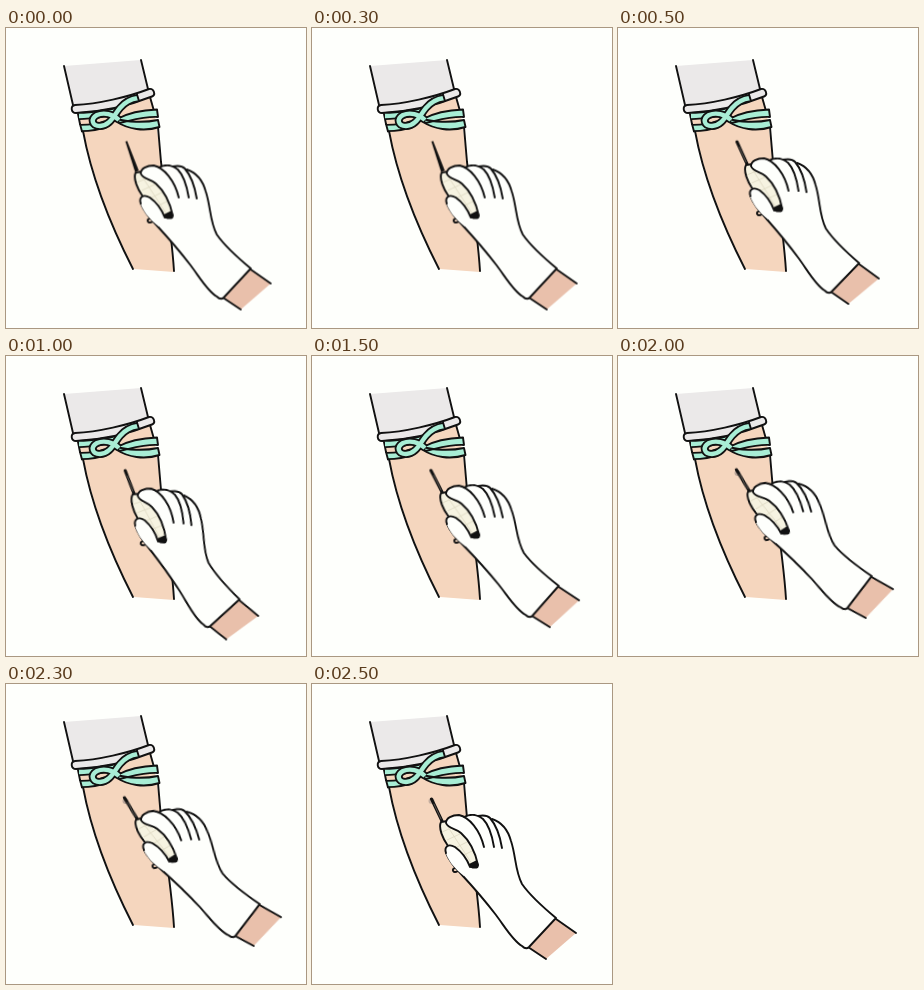
An HTML page for the animation above (3 s loop, 300 by 300 pixels).

```html
<!DOCTYPE html>
<html lang="en">
<head>
<meta charset="utf-8">
<title>Blood draw</title>
<style>
html, body { margin: 0; width: 100%; height: 100%; overflow: hidden; background: #fefffc; }
svg { display: block; width: 100vw; height: 100vh; }
.line { fill: none; stroke: #111; stroke-width: 1.9; stroke-linecap: round; stroke-linejoin: round; }
.skin { fill: #f5d6be; }
.wrist { fill: #e9c0ab; }
.cloth { fill: #ebe9e9; }
.glove { fill: #fefffc; }
.pen { fill: #f6f3e1; }
.ribbon { fill: #a8edd5; }
.edge { fill: none; stroke: #111; stroke-width: 8; stroke-linejoin: round; }
.mint { fill: none; stroke: #a8edd5; stroke-width: 4.4; stroke-linejoin: round; }

#hand { transform-origin: 120px 114px; animation: probe 3s step-end infinite; }
#bare { animation: bare 3s step-end infinite; }
#inserted { animation: inserted 3s step-end infinite; }
#bruise { fill: #55535c; opacity: 0; animation: bruise 3s step-end infinite; }

/* The needle goes in, then the hand swings about its tip. */
@keyframes probe {
  0%       { transform: translate(.7px, 6.5px); }
  16.6666% { transform: translate(-.5px, -1.2px) rotate(1.1deg); }
  33.3333% { transform: translate(-.2px, -.4px) rotate(4.7deg); }
  50%      { transform: translate(-.6px, -.6px) rotate(-1.6deg); }
  66.6666% { transform: translate(-1.2px, -1.4px) rotate(-5.5deg); }
  83.3333%, 100% { transform: none; }
}
@keyframes bare { 0% { opacity: 1; } 16.6666%, 100% { opacity: 0; } }
@keyframes inserted { 0% { opacity: 0; } 16.6666%, 100% { opacity: 1; } }
@keyframes bruise {
  0% { opacity: 0; }
  66.6666% { opacity: .35; }
  83.3333%, 100% { opacity: .3; }
}
</style>
</head>
<body>
<svg viewBox="0 0 300 300">
  <defs>
    <path id="bandLeft" d="M75 100C84 100 92 99 100 96"/>
    <path id="strap" d="M73 88C84 88 94 86 108 84"/>
    <path id="loop" d="M113 92C107 86 98 84 91 87C84 91 86 98 94 98C104 98 108 87 114 80C119 74 125 71 132 70"/>
  </defs>

  <g id="arm">
    <path class="skin" d="M70 82L145 69C149 85 152 105 155 134C161 172 166 210 168 244L128 241C105 197 88 152 77 103Z"/>
    <path class="line" d="M72 86L74 96M77 103C86 152 104 196 127 241M144 69L148 83M152 99L155 134C160 170 166 210 168 243"/>
  </g>

  <g id="sleeve">
    <path class="cloth" d="M58 38L135 32L143 63L67 79Z"/>
    <path class="line" d="M58 38L67 77M135 32L142 61"/>
    <path class="cloth" d="M69 77C92 76 122 69 143 61C148 60 150 67 146 68.500C122 78 95 84 70 85C65 85 64 78 69 77Z"/>
    <path class="line" d="M69 77C92 76 122 69 143 61C148 60 150 67 146 68.500C122 78 95 84 70 85C65 85 64 78 69 77Z"/>
  </g>

  <g id="tourniquet">
    <use href="#strap" class="edge"/><use href="#strap" class="mint"/>
    <use href="#bandLeft" class="edge"/><use href="#bandLeft" class="mint"/>
    <path class="line" d="M74 96L76 103.500"/>
    <g class="ribbon">
      <path d="M111 91C121 94 138 95 152 92L153.500 99C138 104 122 101 111 94Z"/>
      <path d="M111 91C122 85 136 82 151 81.500L152 89C140 88 127 92 113 95Z"/>
    </g>
    <path class="line" d="M111 91C121 94 138 95 152 92L153.500 99C138 104 122 101 111 94ZM111 91C122 85 136 82 151 81.500L152 89C140 88 127 92 113 95Z"/>
    <use href="#loop" class="edge"/><use href="#loop" class="mint"/>
    <path class="line" d="M131 66.500L133 73"/>
  </g>

  <ellipse id="bruise" cx="119.500" cy="117" rx="3" ry="3"/>

  <g id="hand">
    <path id="bare" d="M118.600 107L120.400 106.600L132 136L128.500 138Z" fill="#111"/>
    <g id="inserted" fill="none" stroke-linecap="round">
      <path stroke="#111" stroke-width="3" d="M119.500 115L130 137"/>
      <path stroke="#77706b" stroke-width=".7" d="M122 120L129 135"/>
    </g>

    <path class="wrist" d="M244 235L264 249L234 275L216 263Z"/>
    <path class="line" d="M244 235L264 249M216 263L234 275"/>

    <path class="line" d="M143 184C139 185 141 190 146 187"/>
    <path class="glove" d="M133 164C134 175 143 184 150 191C163 205 174 218 184 231C193 243 201 257 210 262Q214 266 217 263L244 234C232 224 219 213 210 200C203 187 204 172 199 157C196 146 189 138 180 135C171 131 162 130 152 133L140 140Z"/>
    <path class="line" d="M134 169C137 177 143 184 150 191C163 205 174 218 184 231C193 243 201 257 210 262Q214 266 217 263L244 234C232 224 219 213 210 200C203 187 204 172 199 157C196 146 189 138 180 135"/>

    <g id="pen">
      <path class="pen" d="M128 138L137 137L152 147C160 157 165 170 166 182L158 184C145 174 133 160 129 148Z"/>
      <path fill="none" stroke="#ddd8c2" stroke-width=".8" d="M130 148L144 142M135 156L150 149M143 164L157 157M150 172L162 166M136 143L160 180"/>
      <path class="line" d="M136 137L129 138C126 144 131 155 136 162"/>
      <path fill="#111" d="M155 181L165 176C168 181 167 185 164 184.500C161 185 158 184 155 181Z"/>
    </g>

    <path class="glove" d="M133 166C133 161 138 160 143 163C150 168 155 176 158 184L152 192C143 185 135 176 133 166Z"/>
    <path class="line" d="M134 169C132 163 136 159 143 163C150 168 155 175 158 183"/>

    <path class="glove" d="M134 139C134 134 140 131 148 131L165 140L172 165L166 181C163 167 158 157 149 149C144 144 136 145 134 139Z"/>
    <path class="line" d="M166 181C163 167 158 157 149 149C144 144 136 145 134 139C134 134 140 131 147 131C157 133 168 146 172 163M152 133C158 130 165 130 171 135C177 141 180 151 182 163M166 132C171 131 175 131 178 134C185 142 188 152 190 164"/>
  </g>
</svg>
</body>
</html>
```
